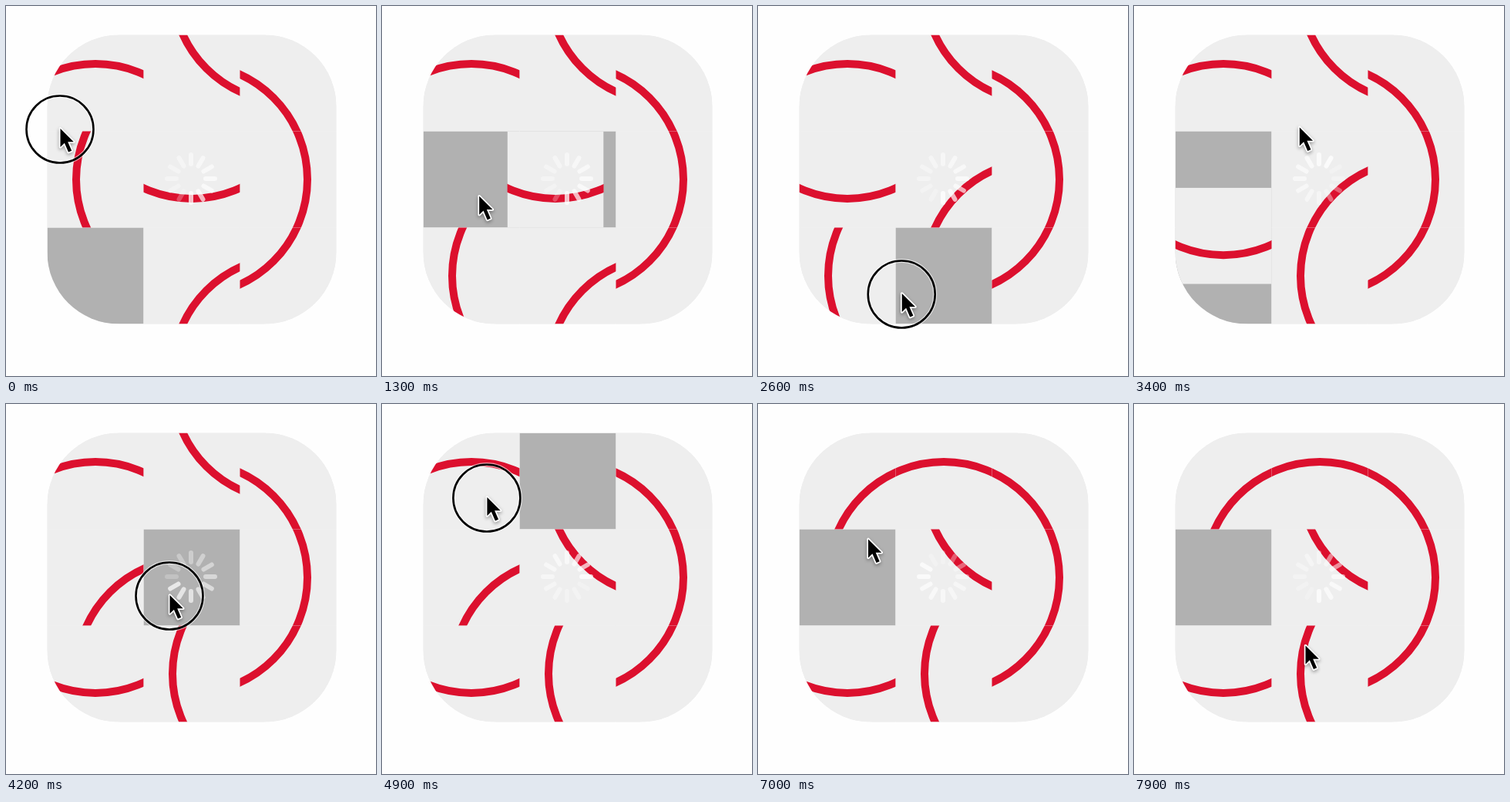
These frames come from a looping animation (480x480 px, 8000 ms). An HTML page with a canvas:

```html
<!DOCTYPE html>
<html lang="en">
<head>
<meta charset="utf-8">
<title>Sliding puzzle</title>
<style>
html, body { margin: 0; width: 100%; height: 100%; overflow: hidden; background: #fefefe; }
canvas { display: block; width: 480px; height: 480px; }
</style>
</head>
<body>
<canvas id="stage"></canvas>
<script>
const LOOP = 8000, STEP = 100, SLIDE = 400, PRESS = 250, REACH = 110;
const X0 = 53.5, Y0 = 37.5, SIZE = 125, GAP = 4;
const canvas = document.getElementById('stage');
const ctx = canvas.getContext('2d');
const scale = window.devicePixelRatio || 1;
canvas.width = canvas.height = 480 * scale;

// Solved index of the piece in each cell, row by row
const layout = [1, 6, 2, 3, 7, 5, GAP, 0, 8];
const left = [-1, 0], right = [1, 0], up = [0, -1], down = [0, 1];

// Each swipe: release time, direction, middle of the stroke
const swipes = [
  [250, down, 70, 270], [1207, left, 216, 233], [1850, up, 255, 235],
  [2735, right, 200, 374], [3178, down, 138, 303], [3700, left, 111, 136],
  [4300, down, 212, 215], [5071, right, 196, 122], [5540, up, 165, 175]
];

// Pointer keys: time, x, y, pressed until the next key
const pointer = swipes.flatMap(([time, [dx, dy], x, y]) => [
  [time - PRESS, x - dx * REACH, y - dy * REACH, true],
  [time, x + dx * REACH, y + dy * REACH, false]
]);
pointer.push([6000, 196.5, 161], [7400, 130, 180], [7900, 222, 314.5], [LOOP, 222, 314.5]);

const ease = p => (1 - Math.cos(Math.PI * Math.max(0, Math.min(1, p)))) / 2;
const column = cell => cell % 3;
const row = cell => Math.floor(cell / 3);

function drawTile(home, x, y) {
  ctx.save();
  ctx.translate(X0 + x * SIZE, Y0 + y * SIZE);
  ctx.beginPath();
  ctx.rect(0, 0, SIZE, SIZE);
  ctx.clip();
  ctx.fillStyle = home === GAP ? '#b1b1b1' : '#eee';
  ctx.fill();
  if (home !== GAP) {
    ctx.beginPath();
    ctx.arc((1.5 - column(home)) * SIZE, (1.5 - row(home)) * SIZE, 150, 0, Math.PI * 2);
    ctx.lineWidth = 10;
    ctx.strokeStyle = '#dc102e';
    ctx.stroke();
  }
  ctx.restore();
}

function drawBoard(t) {
  const cells = [...layout];
  let moving;
  for (const [time, [dx, dy]] of swipes) {
    if (time > t) break;
    const to = cells.indexOf(GAP), from = to - dx - 3 * dy;
    const home = cells[from], p = ease((t - time) / SLIDE);
    cells[from] = GAP;
    if (p < 1) moving = [home, column(from) + dx * p, row(from) + dy * p];
    else cells[to] = home;
  }
  ctx.save();
  ctx.beginPath();
  ctx.roundRect(X0, Y0, SIZE * 3, SIZE * 3, 93);
  ctx.clip();
  ctx.fillStyle = '#eee';
  ctx.fillRect(0, 0, 480, 480);
  cells.forEach((home, cell) => drawTile(home, column(cell), row(cell)));
  if (moving) drawTile(...moving);
  ctx.restore();
}

function drawSpinner(t) {
  const head = 6 + t * 12 / 1300;
  ctx.save();
  ctx.translate(240, 224);
  ctx.lineCap = 'round';
  ctx.lineWidth = 6;
  for (let i = 0; i < 12; i++) {
    const age = (((head - i) % 12) + 12) % 12;
    ctx.strokeStyle = `rgba(255,255,255,${.75 - age * .045})`;
    ctx.beginPath();
    ctx.moveTo(0, -19);
    ctx.lineTo(0, -31);
    ctx.stroke();
    ctx.rotate(Math.PI / 6);
  }
  ctx.restore();
}

function ring(width, color) {
  ctx.beginPath();
  ctx.arc(0, 0, 43.5, 0, Math.PI * 2);
  ctx.lineWidth = width;
  ctx.strokeStyle = color;
  ctx.stroke();
}

const arrow = new Path2D('M.5-1V23L5.9 17.8L11 29.6L15.2 27.8L10.2 16.3H17.8Z');

function drawPointer(t) {
  const i = pointer.findIndex(key => key[0] > t);
  const [t0, x0, y0, pressed] = pointer[i - 1];
  const [t1, x1, y1] = pointer[i];
  const p = ease((t - t0) / (t1 - t0));
  ctx.save();
  ctx.translate(x0 + (x1 - x0) * p, y0 + (y1 - y0) * p);
  if (pressed) {
    ring(5, 'rgba(255,255,255,.6)');
    ring(2.6, '#000');
  }
  ctx.lineWidth = 3.5;
  ctx.lineJoin = 'round';
  ctx.strokeStyle = '#fff';
  ctx.shadowColor = 'rgba(0,0,0,.35)';
  ctx.shadowBlur = 4 * scale;
  ctx.shadowOffsetY = 2 * scale;
  ctx.stroke(arrow);
  ctx.shadowColor = 'transparent';
  ctx.fillStyle = '#000';
  ctx.fill(arrow);
  ctx.restore();
}

function draw(now) {
  const t = Math.floor(now % LOOP / STEP) * STEP;
  ctx.setTransform(scale, 0, 0, scale, 0, 0);
  ctx.fillStyle = '#fefefe';
  ctx.fillRect(0, 0, 480, 480);
  drawBoard(t);
  drawSpinner(t);
  drawPointer(t);
}

let begin;
function tick(now) {
  begin ??= now;
  draw(now - begin);
  requestAnimationFrame(tick);
}
draw(0);
requestAnimationFrame(tick);
</script>
</body>
</html>
```
